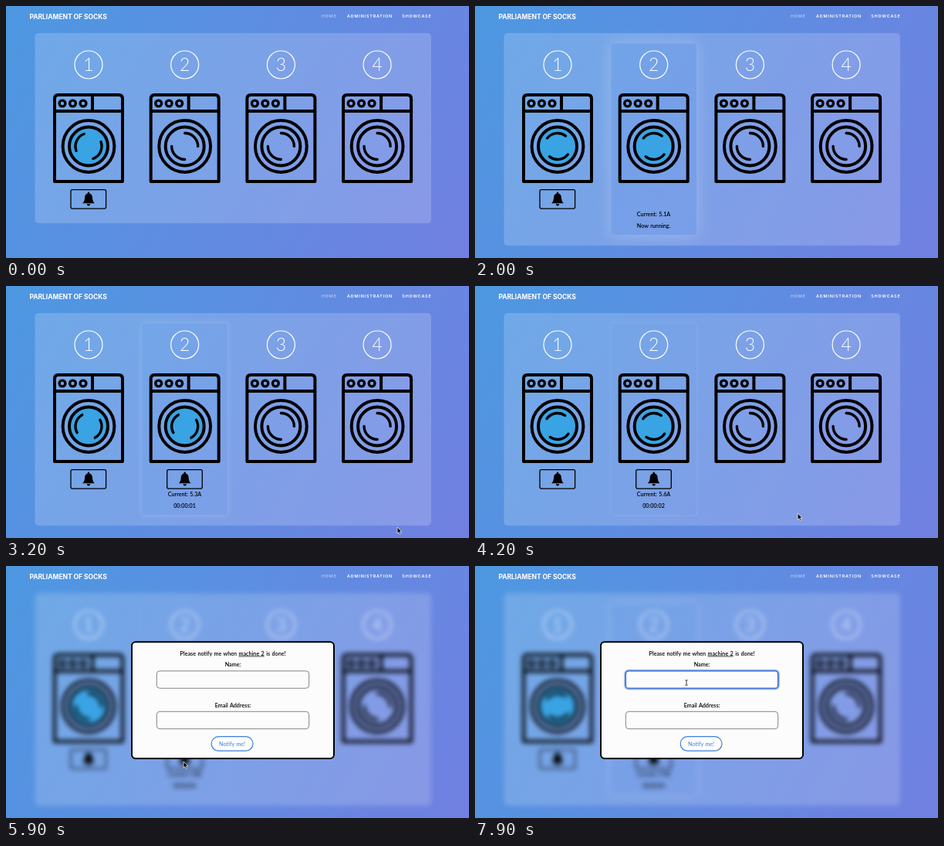
Recreate the animation shown at these times as an HTML page. Size 600 px wide and 326 px high, loop 8 s.

```html
<!DOCTYPE html>
<html lang="en">
<head>
<meta charset="utf-8">
<title>Laundry dashboard</title>
<style>
  html, body { margin: 0; width: 100%; height: 100%; overflow: hidden; }
  body { background: linear-gradient(120deg, #4d98e1, #7180e1); }
  svg { display: block; width: 100vw; height: 100vh; }
  text { font: 600 7.2px Lato, "Open Sans", sans-serif; word-spacing: .6px; text-anchor: middle; }
  .brand { font: 700 8.6px Inter, sans-serif; letter-spacing: -.1px; text-anchor: start; fill: #fff; word-spacing: 0; }
  .nav { font: 600 5.4px Inter, sans-serif; letter-spacing: .85px; text-anchor: start; fill: #fff; }
  .number { font: 300 23px Lato, sans-serif; fill: #fff; }
  .line { fill: none; stroke: #000; stroke-width: 4; stroke-linejoin: round; }
  .field { fill: #fcfcfc; stroke: #777; stroke-width: .9; }
</style>
</head>
<body>
<svg viewBox="0 0 600 326" preserveAspectRatio="none">
  <defs>
    <mask id="outside" maskUnits="userSpaceOnUse" x="0" y="0" width="600" height="326">
      <rect width="600" height="326" fill="#fff"/>
      <rect x="176.5" y="48.5" width="110.5" height="247.5" rx="4" fill="#000"/>
    </mask>
    <g id="body">
      <path class="line" d="M-44 227V120q0-5 5-5H39q5 0 5 5V227ZM-44 136H44M5 115V136"/>
      <g class="line" style="stroke-width:3.4">
        <circle cx="-34" cy="126" r="3.9"/>
        <circle cx="-20.5" cy="126" r="3.9"/>
        <circle cx="-7" cy="126" r="3.9"/>
      </g>
      <circle class="line" cy="181.5" r="33.4"/>
    </g>
    <path id="arcs" class="line" style="stroke-width:3.4;stroke-linecap:round"
      d="M0-17A17 17 0 0 1 17 0M0 17A17 17 0 0 1-17 0"/>
    <path id="bell" d="M-8 5.5Q-5 3-5-1.5Q-5-6-1.2-7.2V-8a1.2 1.2 0 0 1 2.4 0v.8Q5-6 5-1.5Q5 3 8 5.5ZM-2.2 6.5H2.2A2.2 2.2 0 0 1-2.2 6.5Z"/>
  </defs>

  <text class="brand" x="30.5" y="17.4">PARLIAMENT OF SOCKS</text>
  <text class="nav" x="409" y="15" opacity=".5">HOME</text>
  <text class="nav" x="442" y="15">ADMINISTRATION</text>
  <text class="nav" x="513.3" y="15">SHOWCASE</text>

  <g id="dashboard">
    <rect id="card" x="37.5" y="35" width="513.5" height="246" rx="5" fill="#fff" fill-opacity=".18"/>
    <g id="highlight">
      <rect id="tint" x="176.5" y="48.5" width="110.5" height="247.5" rx="4" fill="#5a96eb"/>
      <g mask="url(#outside)">
        <rect id="glow" x="174.5" y="46.5" width="114.5" height="251.5" rx="5" fill="#fff"/>
      </g>
    </g>
    <g id="machines"></g>
    <g id="status">
      <text id="current" x="231.5" y="272"></text>
      <text id="timer" x="231.5" y="287"></text>
    </g>
  </g>

  <g id="modal">
    <rect x="163" y="98.2" width="262" height="150.8" rx="5" fill="#fcfcfc" stroke="#000" stroke-width="2"/>
    <text x="294" y="115.6">Please notify me when <tspan text-decoration="underline">machine 2</tspan> is done!</text>
    <text x="294" y="130.4">Name:</text>
    <rect id="ring" x="194.5" y="135" width="199" height="24" rx="4.5" fill="none" stroke="#8fb4f2" stroke-width="2.6"/>
    <rect id="name" class="field" x="195.3" y="135.8" width="197.4" height="22.4" rx="4"/>
    <text x="294" y="183">Email Address:</text>
    <rect class="field" x="195.3" y="188.3" width="197.4" height="22.4" rx="4"/>
    <rect x="266.2" y="220.6" width="53.8" height="18.6" rx="9.3" fill="#fcfcfc" stroke="#3f7fe0" stroke-width="1.2"/>
    <text x="293.1" y="232.5" style="font-weight:400;fill:#3f7fe0">Notify me!</text>
  </g>

  <g id="cursor">
    <path id="arrow" d="M0 0V8.2L1.9 6.5 3.2 9.3 4.6 8.7 3.4 5.9H6Z" fill="#000" stroke="#fff" stroke-width=".7"/>
    <path id="beam" d="M-1.6-3.4Q0-3.4 0-2.4Q0-3.4 1.6-3.4M0-2.4V2.4M-1.6 3.4Q0 3.4 0 2.4Q0 3.4 1.6 3.4" fill="none" stroke="#222" stroke-width=".9"/>
  </g>
</svg>
<script>
const LOOP = 8000, STEP = 100;
const START = 1500, TIMER = 1900, CLICK = 5500, FOCUS = 7500;
const SPIN = 0.244;      // degrees per ms
const PULSE = 1550;
const $ = id => document.getElementById(id);

// time, x, y
const cursorPath = [
  [2300, 567, 304], [2700, 507, 311], [3200, 507, 312], [3500, 508, 318],
  [3900, 516, 317], [4300, 400, 290], [4700, 236, 259], [5100, 233, 255],
  [5500, 230, 253], [6400, 230, 253], [6900, 274, 151], [LOOP, 274, 151]
];
const currents = ["5.1", "5.3", "5.6", "5.8", "5.8", "5.9", "5.9"];

$("machines").innerHTML = [1, 2, 3, 4].map(n => `
  <g transform="translate(${107 + (n - 1) * 124.7} 0)">
    <circle cy="76" r="18" fill="none" stroke="#fff" stroke-width="1.2"/>
    <text class="number" y="84.4">${n}</text>
    <use href="#body"/>
    <circle id="drum${n}" class="line" cy="181.5" r="25"/>
    <g transform="translate(0 181.5)"><use id="arcs${n}" href="#arcs"/></g>
    <g id="alarm${n}">
      <rect x="-23" y="237.7" width="45.6" height="24.4" rx="2" fill="none" stroke="#000" stroke-width="1.3"/>
      <g transform="translate(0 249.8)"><use id="bell${n}" href="#bell"/></g>
    </g>
  </g>`).join("");

const show = (id, on) => $(id).setAttribute("display", on ? "inline" : "none");
const rotate = (id, angle) => $(id).setAttribute("transform", `rotate(${angle})`);
const smooth = p => p * p * (3 - 2 * p);
const clamp = p => Math.min(1, Math.max(0, p));

function cursorAt(t) {
  const i = cursorPath.findIndex(p => p[0] > t);
  const [t0, x0, y0] = cursorPath[i - 1], [t1, x1, y1] = cursorPath[i];
  const p = smooth((t - t0) / (t1 - t0));
  return [x0 + (x1 - x0) * p, y0 + (y1 - y0) * p];
}

function drawMachines(t) {
  const running = t >= START;
  const angle = SPIN * (t - 1475);
  const seconds = Math.max(0, Math.floor((t - TIMER) / 1000));
  rotate("arcs1", running ? angle : SPIN * t + 70);
  rotate("arcs2", running ? angle : 0);
  [1, 2, 3, 4].forEach(n => {
    const on = n === 1 || n === 2 && running;
    $("drum" + n).style.fill = on ? "#3aa3e3" : "none";
    show("alarm" + n, n === 1 || n === 2 && seconds > 0);
  });
  const hovered = t >= 4700 && t < CLICK;
  rotate("bell2", hovered ? -15 * Math.cos((t - 5100) / 600 * 2 * Math.PI) : 0);

  $("card").setAttribute("height", running ? 275 : 246);
  show("status", running);
  $("current").textContent = `Current: ${currents[seconds]}A`;
  $("timer").textContent = seconds ? `00:00:0${seconds}` : "Now running.";
}

function drawGlow(t) {
  const wave = (1 + Math.cos((t - 2025) / PULSE * 2 * Math.PI)) / 2;
  const amount = wave * wave;
  show("highlight", t >= START);
  $("tint").setAttribute("opacity", 0.14 * amount);
  $("glow").setAttribute("opacity", 0.03 + 0.19 * Math.sqrt(amount));
  $("glow").style.filter = `blur(${0.6 + 9 * amount}px)`;
}

function drawModal(t) {
  const open = clamp((t - CLICK) / 200);
  show("modal", open > 0);
  $("modal").setAttribute("opacity", open);
  $("dashboard").style.filter = open ? `blur(${3 * open}px)` : "none";
  const focused = t >= FOCUS;
  show("ring", focused);
  $("name").style.stroke = focused ? "#2f62c8" : "";
  $("name").style.strokeWidth = focused ? 1.3 : "";
}

function drawCursor(t) {
  const visible = t >= cursorPath[0][0];
  show("cursor", visible);
  if (!visible) return;
  const [x, y] = cursorAt(t);
  const inField = t > CLICK && y < 158.5;
  $("cursor").setAttribute("transform", `translate(${x} ${y})`);
  show("arrow", !inField);
  show("beam", inField);
}

function draw(t) {
  drawMachines(t);
  drawGlow(t);
  drawModal(t);
  drawCursor(t);
}

const begin = performance.now();
function tick() {
  const elapsed = (performance.now() - begin) % LOOP;
  draw(Math.floor(elapsed / STEP) * STEP);
  requestAnimationFrame(tick);
}
tick();
</script>
</body>
</html>
```
